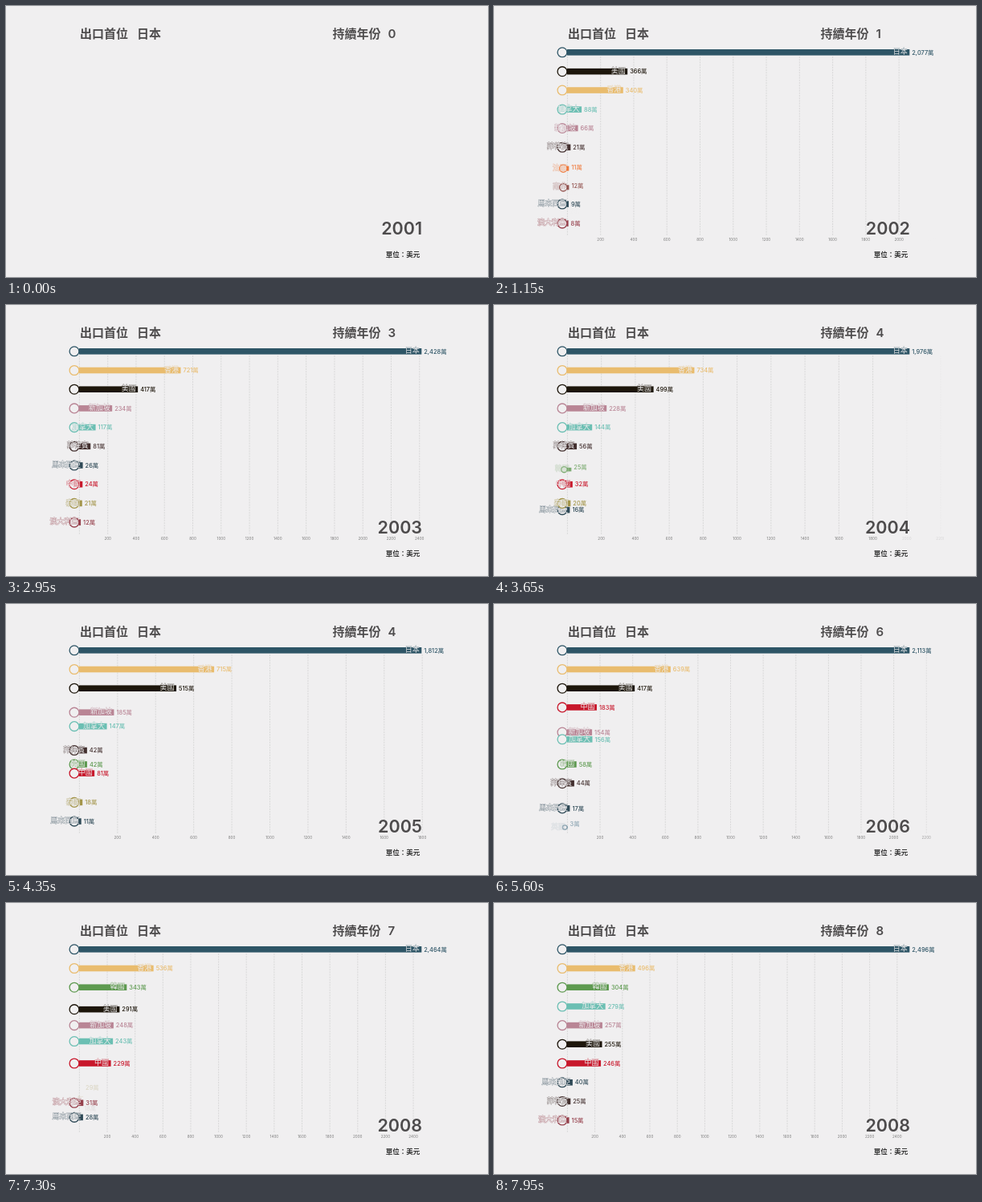
An HTML page with a canvas that plays this animation: 600 by 338 pixels, repeating every 8000 ms.

```html
<!DOCTYPE html>
<html lang="zh-Hant">
<head>
<meta charset="utf-8">
<style>
html, body { margin: 0; width: 100%; height: 100%; overflow: hidden; background: #f0eff0; }
canvas { display: block; width: 600px; height: 338px; }
</style>
</head>
<body>
<canvas id="stage"></canvas>
<script>
const W = 600, H = 338, LOOP = 8000, YEARS = 8, SHOWN = 10;
const BG = '#f0eff0', INK = '#4d4b4c';
const X0 = 91, SPAN = 426.3, TOP = 57.8, ROW = 23.7, BAR = 7.6, STEP = 200;
const EASE_LAG = 0.03, AXIS_LAG = 0.06;
const FONT = 'Inter, "Noto Sans CJK TC", "Noto Sans CJK JP", "Noto Sans CJK", sans-serif';

// Turning points per country, keyed by years since the start; straight lines join them.
const series = [
  ['日本', '#2e5566', { 1: 2048, 3: 2438, 4: 1728, 7: 2450, 8: 2498 }],
  ['美國', '#1d160b', { 1: 362, 3: 418, 4: 542, 7: 308, 8: 252 }],
  ['香港', '#e9bc6e', { 1: 308, 3: 731, 4: 736, 7: 554, 8: 493 }],
  ['法國', '#ef6f2b', { 1: 12.5, 2: 4 }],
  ['南非', '#8a4440', { 1: 12.2, 2: 9 }],
  ['菲律賓', '#43302f', { 1: 16, 3: 82.7, 4: 41.4, 6: 44.6, 7: 15, 8: 25.5 }],
  ['馬來西亞', '#2f4a57', { 1: 8, 3: 26.5, 4: 9.9, 7: 23, 8: 41 }],
  ['澳大利亞', '#96404c', { 1: 7.5, 3: 12, 6: 3, 7: 38, 8: 13.8 }],
  ['泰國', '#a3954a', { 1: 0, 3: 22, 5: 16, 6: 4, 7: 42 }],
  ['英國', '#5f8296', { 6: 5 }],
  ['新加坡', '#b98595', { 1: 52, 3: 239, 4: 222, 5: 115.6, 7: 243.6, 8: 257.7 }],
  ['加拿大', '#6bbfb3', { 1: 85.6, 3: 118, 4: 158.6, 5: 125.4, 7: 227, 8: 281.7 }],
  ['韓國', '#5e9a50', { 4: 38, 6: 63, 7: 361, 8: 301 }],
  ['中國', '#c8182c', { 1: 0, 3: 25, 4: 35, 5: 167, 8: 247.6 }]
].map(([name, color, points]) => ({ name, color, points }));

const clamp = x => Math.min(1, Math.max(0, x));
const lerp = (a, b, p) => a + (b - a) * p;
const cubic = x => x < 0.5 ? 4 * x ** 3 : 1 - 4 * (1 - x) ** 3;

function valueAt(points, year) {
  const keys = Object.keys(points).map(Number);
  const i = keys.findIndex(key => key >= year);
  if (i < 0 || year < keys[0]) return 0;
  if (keys[i] === year) return points[year];
  const a = keys[i - 1], b = keys[i];
  return lerp(points[a], points[b], (year - a) / (b - a));
}

const years = Array.from({ length: YEARS + 1 }, (_, k) => k);
series.forEach(s => { s.vals = years.map(k => valueAt(s.points, k)); });
const rankOf = (s, k) => s.vals[k] ? series.filter(o => o.vals[k] > s.vals[k]).length : SHOWN;
series.forEach(s => { s.ranks = years.map(k => rankOf(s, k)); });

const peaks = years.map(k => Math.max(...series.map(s => s.vals[k])));
const topTick = k => Math.round(peaks[k] / STEP) * STEP;

function peakAt(t) {
  if (t < 1) return peaks[1];
  const k = Math.floor(t);
  return lerp(peaks[k], peaks[k + 1], t - k);
}

const cv = document.getElementById('stage');
const ctx = cv.getContext('2d');
const dpr = window.devicePixelRatio || 1;
cv.width = W * dpr;
cv.height = H * dpr;

function text(str, x, y, size, weight, color, align = 'left') {
  ctx.font = `${weight} ${size}px ${FONT}`;
  ctx.textAlign = align;
  ctx.fillStyle = color;
  ctx.fillText(str, x, y);
}

function drawAxis(k, e, peak) {
  ctx.save();
  ctx.beginPath();
  ctx.rect(0, 0, 560, H);
  ctx.clip();
  ctx.lineWidth = 0.7;
  ctx.strokeStyle = '#cfcecf';
  ctx.setLineDash([2, 1.2]);
  const from = k ? topTick(k) : -1, to = topTick(k + 1);
  for (let v = 0; v <= Math.max(from, to); v += STEP) {
    ctx.globalAlpha = v <= Math.min(from, to) ? 1 : v <= to ? e : 1 - e;
    const x = X0 + 0.4 + v / peak * SPAN;
    ctx.beginPath();
    ctx.moveTo(x, 63);
    ctx.lineTo(x, 287);
    ctx.stroke();
    if (v) text(String(v), x, 293, 4.6, 400, '#777', 'center');
  }
  ctx.restore();
}

function drawName(s, x, y) {
  const alpha = ctx.globalAlpha;
  ctx.font = `500 9px ${FONT}`;
  ctx.textAlign = 'right';
  ctx.lineJoin = 'round';
  ctx.lineWidth = 0.9;
  ctx.globalAlpha = alpha * 0.5;
  ctx.strokeText(s.name, x, y);
  ctx.globalAlpha = alpha;
  text(s.name, x, y, 9, 500, '#ecebec', 'right');
}

function drawBar(s, k, f, e, peak) {
  const from = s.ranks[k], to = s.ranks[k + 1];
  const was = from < SHOWN, is = to < SHOWN;
  if (!was && !is) return;

  let rank = lerp(from, to, e), grow = 1;
  if (!was) {
    grow = e;
    rank = to + 1 - e;
  } else if (!is) {
    const out = cubic(clamp(f * 2));
    grow = 1 - out;
    rank = from + out;
  }
  if (grow <= 0) return;

  const value = lerp(s.vals[k], s.vals[k + 1], k ? f : e);
  const size = grow * grow;
  const y = TOP + rank * ROW;
  const end = X0 + value / peak * SPAN;

  ctx.save();
  ctx.globalAlpha = grow;
  ctx.fillStyle = s.color;
  ctx.fillRect(X0, y - BAR * size / 2, end - X0, BAR * size);

  ctx.beginPath();
  ctx.arc(X0 - 6 * size, y, 5.9 * size, 0, Math.PI * 2);
  ctx.fillStyle = BG;
  ctx.fill();
  ctx.lineWidth = 1.3;
  ctx.strokeStyle = s.color;
  ctx.stroke();

  const label = Math.round(value).toLocaleString('en-US') + '萬';
  text(label, end + 3, y - (1 - grow) * 14.5 + 2.7, 7.4, 500, s.color);
  ctx.globalAlpha = size * size;
  drawName(s, end - 2.5, y + 2.1);
  ctx.restore();
}

function draw(ms) {
  const t = ms / 1000, k = Math.floor(t), f = t - k;
  const e = cubic(clamp(f - EASE_LAG));

  ctx.setTransform(dpr, 0, 0, dpr, 0, 0);
  ctx.fillStyle = BG;
  ctx.fillRect(0, 0, W, H);

  drawAxis(k, e, peakAt(t - AXIS_LAG));
  series.forEach(s => drawBar(s, k, f, e, peakAt(t)));

  const title = (str, x) => text(str, x, 40.3, 15, 600, INK);
  title('出口首位', 92);
  title('日本', 163);
  title('持續年份', 406.5);
  title(String(Math.round(t)), 475.5);
  text(String(2001 + k), 518, 284.8, 21.5, 600, INK, 'right');
  text('單位：美元', 472.8, 313.3, 8.5, 600, '#333');
}

function tick(now) {
  draw(now % LOOP);
  requestAnimationFrame(tick);
}
draw(0);
requestAnimationFrame(tick);
</script>
</body>
</html>
```
